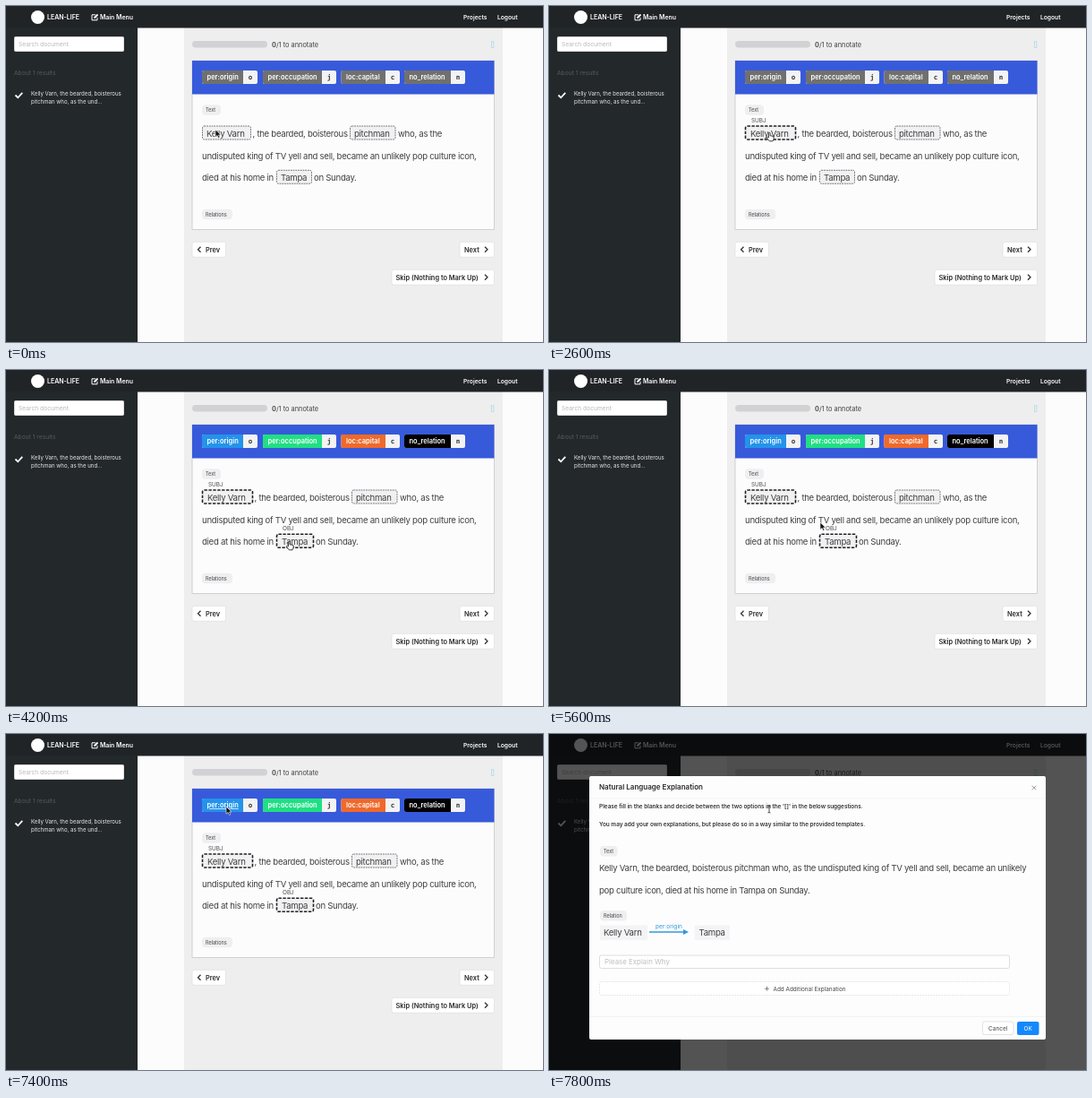
Animation, 600 px wide and 375 px high, one loop 8 s. Source, as an HTML page:

```html
<!DOCTYPE html>
<html lang="en">
<head>
<meta charset="utf-8">
<title>Relation annotation</title>
<style>
  html, body { margin: 0; height: 100%; overflow: hidden; background: #fff; }
  svg { display: block; width: 100vw; height: 100vh; font-family: Inter, Roboto, sans-serif; }
  .bold { font-weight: 600; }
  .body { font-size: 9.6px; letter-spacing: -.03em; fill: #404040; }
  .key { font: bold 7.5px "DejaVu Sans Mono", monospace; }
</style>
</head>
<body>
<svg id="stage" viewBox="0 0 600 375"></svg>
<script>
const PERSON = 'Kelly Varn';
const LOOP = 8000;

// Moments (ms) at which the interface changes.
const HOVER_SUBJECT = 600, PICK_SUBJECT = 2200, HOVER_OBJECT = 3200, PICK_OBJECT = 4200,
      HOVER_LABEL = 6400, MODAL_OPENING = 7600, MODAL_OPEN = 7800;

// Cursor steps: start time, x, y, shape.
const CURSOR = [
  [0, 234, 138, 'arrow'], [600, 234, 139, 'hand'], [1400, 236, 140, 'hand'],
  [1600, 239, 140.5, 'hand'], [2600, 243, 141, 'hand'], [2800, 280, 159, 'arrow'],
  [3000, 300, 180, 'arrow'], [3200, 311, 191, 'hand'], [3400, 313, 191, 'hand'],
  [5600, 303, 170, 'arrow'], [5800, 285, 135, 'arrow'], [6000, 277, 123, 'arrow'],
  [6200, 267, 105, 'arrow'], [6400, 257, 82, 'hand'], [6600, 242, 82, 'hand'],
  [7400, 246, 81, 'arrow'], [7800, 246, 84, 'beam']
];

const rect = (x, y, w, h, fill, attrs = '') =>
  `<rect x="${x}" y="${y}" width="${w}" height="${h}" fill="${fill}" ${attrs}/>`;
const text = (x, y, size, str, attrs = '') =>
  `<text x="${x}" y="${y}" font-size="${size}" ${attrs}>${str}</text>`;
const line = (d, color, width = 1, attrs = '') =>
  `<path d="${d}" fill="none" stroke="${color}" stroke-width="${width}" ${attrs}/>`;
const body = (x, y, str) => text(x, y, 9.6, str, 'class="body"');
const caption = (x, y, w, str) =>
  rect(x, y, w, 11.5, '#efeef0', 'rx="4"') + text(x + 4, y + 7.9, 5.5, str, 'fill="#444"');

function entity(x, y, w, str, hover, picked, role) {
  const border = picked
    ? 'stroke="#222" stroke-width="1.6" stroke-dasharray="3.4 1.5"'
    : 'stroke="#666" stroke-width=".9" stroke-dasharray="1.8 .9"';
  const grow = picked ? 1 : 0;
  return rect(x + .5, y - 12, w + 2 * grow, 15, hover ? '#fdfdfd' : '#f1f0f2', 'rx="2" ' + border) +
    body(x + 5 + grow, y, str) +
    (picked ? text(x + 7, y - 16.3, 6.4, role, 'fill="#4a4a4a"') : '');
}

function label(x, w, name, key, color, underline) {
  const split = x + w;
  return rect(x, 72, w + 16, 15, '#f3f3f3', 'rx="2"') +
    `<path d="M${split} 72H${x + 2}q-2 0-2 2v11q0 2 2 2H${split}z" fill="${color}"/>` +
    text(x + 5.5, 82.2, 7.5, name,
      `class="bold" fill="#fff" ${underline ? 'text-decoration="underline"' : ''}`) +
    text(split + 8, 82.2, 7.5, key, 'class="key" text-anchor="middle" fill="#333"');
}

function button(x, y, w, str, textX, chevron) {
  return rect(x, y, w, 17, '#fff', 'rx="2" stroke="#dedddf" stroke-width=".7"') +
    text(textX, y + 11.3, 7.4, str, 'class="bold" fill="#2a2a2a"') +
    (chevron < 0 ? line(`M217.5 ${y + 5.5}l-3 3 3 3`, '#333', 1.3)
                 : line(`M535 ${y + 5.5}l3 3-3 3`, '#333', 1.3));
}

function relation(x, y, nameX, size, start, end, labelX) {
  return body(x, y, PERSON) + body(nameX, y, 'Tampa') +
    line(`M${start} ${y - 4}H${end - 4}`, '#3298dc', 1.5) +
    `<path d="M${end} ${y - 4}l-6-3v6z" fill="#3298dc"/>` +
    text(labelX, y - 8, size, 'per:origin', 'fill="#3298dc"');
}

function topBar() {
  return rect(0, 0, 600, 24.5, '#202427') +
    '<circle cx="35.5" cy="12.5" r="7.5" fill="#fff"/>' +
    '<g class="bold" fill="#fff">' +
    text(46, 15.2, 7, 'LEAN-LIFE') + text(105, 15.2, 6.9, 'Main Menu') +
    text(511, 15.2, 6.7, 'Projects') + text(549, 15.2, 6.7, 'Logout') + '</g>' +
    line('M100 9.8h-4v6h6v-3', '#fff') + line('M98.5 13.5l4-4', '#fff', 1.8);
}

function sidebar() {
  return rect(0, 24, 147, 351, '#23282b') +
    rect(9.5, 34.5, 122, 16, '#fff', 'rx="1" stroke="#dbdbdb"') +
    text(14, 45, 6.7, 'Search document', 'fill="#b9b9b9"') +
    text(9, 77, 6.7, 'About 1 results', 'fill="#555a5e"') +
    line('M10.5 99.5l2.8 2.8 5-5.5', '#fff', 1.8) +
    '<g fill="#e8e8e8">' + text(28, 100, 6.1, PERSON + ', the bearded, boisterous') +
    text(28, 109, 6.1, 'pitchman who, as the und...') + '</g>';
}

function page(t) {
  const subject = t >= PICK_SUBJECT, object = t >= PICK_OBJECT, related = t >= MODAL_OPENING;
  const shiftSubject = subject ? 2 : 0, shiftObject = object ? 2 : 0, drop = related ? 25 : 0;
  const color = c => object ? c : '#70706f';
  return rect(0, 0, 600, 375, '#fdfcfd') + rect(199, 24, 356, 351, '#efeeef') +
    topBar() + sidebar() +
    rect(208, 39, 84, 7.5, '#d2d1d3', 'rx="3.75"') +
    text(297, 46, 7.4, '<tspan class="bold">0</tspan>/1 to annotate', 'fill="#444"') +
    rect(542.3, 39.8, 2.6, 6.6, '#e6f4f5', 'stroke="#a9d3d8" stroke-width=".7"') +
    rect(208, 61, 337.5, 188.5 + drop, '#fdfcfd', 'stroke="#c8c7c9" stroke-width=".8"') +
    rect(208, 61, 337.5, 37.5, '#375adb') +
    label(219, 46, 'per:origin', 'o', color('#2493ea'), t >= HOVER_LABEL && !related) +
    label(287, 66, 'per:occupation', 'j', color('#20df83')) +
    label(374.5, 49.5, 'loc:capital', 'c', color('#f0692a')) +
    label(445, 52, 'no_relation', 'n', color('#000')) +
    caption(219, 110.3, 21, 'Text') +
    entity(219, 146, 54, PERSON, t >= HOVER_SUBJECT && !subject, subject, 'SUBJ') +
    body(275.5 + shiftSubject, 146, ', the bearded, boisterous') +
    entity(384 + shiftSubject, 146, 50.5, 'pitchman') +
    body(438 + shiftSubject, 146, 'who, as the') +
    body(219, 170.5, 'undisputed king of TV yell and sell, became an unlikely pop culture icon,') +
    body(219, 195.3, 'died at his home in') +
    entity(302, 195.3, 39, 'Tampa', t >= HOVER_OBJECT && !object, object, 'OBJ') +
    body(344 + shiftObject, 195.3, 'on Sunday.') +
    caption(219, 226.7, 34, 'Relations') +
    (related ? relation(224, 255, 330, 6.8, 275, 317, 281) +
      '<circle cx="530" cy="251.5" r="3.4" fill="none" stroke="#444" stroke-width=".8"/>' +
      line('M528.2 251.5h3.6', '#444', .9) : '') +
    button(208, 263.3 + drop, 37.5, 'Prev', 223, -1) +
    button(507, 263.3 + drop, 38.5, 'Next', 512, 1) +
    button(431, 294.3 + drop, 114.5, 'Skip (Nothing to Mark Up)', 435.5, 1);
}

function modal() {
  return rect(45, 47, 510, 294, '#fefdfe', 'rx="2"') +
    text(56, 62.3, 8.03, 'Natural Language Explanation', 'font-weight="600" fill="#2b2b2b"') +
    line('M539.7 57.7l4.6 4.6m0-4.6l-4.6 4.6', '#888', .8) +
    line('M45 72H555M45 315.5H555', '#efeeef', .7) +
    '<g class="bold" fill="#333">' +
    text(56, 82.5, 6.42, "Please fill in the blanks and decide between the two options in the '[]' in the below suggestions.") +
    text(56, 103, 6.42, 'You may add your own explanations, but please do so in a way similar to the provided templates.') + '</g>' +
    caption(57, 125, 19.5, 'Text') +
    body(56, 153, PERSON + ', the bearded, boisterous pitchman who, as the undisputed king of TV yell and sell, became an unlikely') +
    body(56, 178, 'pop culture icon, died at his home in Tampa on Sunday.') +
    caption(57, 197, 30, 'Relation') +
    rect(57, 213.5, 53, 16.5, '#f4f3f5') + rect(162.5, 213.5, 39.5, 16.5, '#f4f3f5') +
    relation(61, 225, 167.5, 6.6, 112, 156, 119) +
    rect(56.5, 247, 458, 14.5, '#fff', 'rx="2" stroke="#d5d4d6" stroke-width=".8"') +
    text(62, 257, 7.9, 'Please Explain Why', 'fill="#bdbdbd"') +
    rect(56.5, 276.5, 458, 15, '#fff', 'rx="2" stroke="#dcdcdc" stroke-width=".7" stroke-dasharray="1.8 1.2"') +
    line('M241 284.2h5m-2.5-2.5v5', '#555', .7) +
    text(250.5, 286.6, 6.4, 'Add Additional Explanation', 'fill="#444"') +
    rect(484.5, 321, 34.5, 14.5, '#fff', 'rx="2" stroke="#d5d4d6" stroke-width=".7"') +
    text(501.7, 330.8, 6.5, 'Cancel', 'text-anchor="middle" fill="#444"') +
    rect(523, 321, 24.5, 15, '#1688fb', 'rx="2"') +
    text(535.2, 330.8, 6.5, 'OK', 'text-anchor="middle" fill="#fff"');
}

function overlay(t) {
  if (t < MODAL_OPENING) return '';
  const open = t >= MODAL_OPEN;
  const pose = open ? '' : 'transform="translate(138.7 92.2) scale(.539)" opacity=".34"';
  return rect(0, 0, 600, 375, '#000', `opacity="${open ? .67 : .2}"`) + `<g ${pose}>${modal()}</g>`;
}

const CURSOR_SHAPES = {
  arrow: '<path d="M0 0v8.2l2-1.8 1.4 3 1.4-.6-1.3-2.9h2.6z" fill="#111" stroke="#fff" stroke-width=".6"/>',
  hand: '<path d="M2.5 5.8V1.2q0-1 .8-1t.8 1v2.6q2 0 4 1v2.5l-1 2.5H3.2L.5 6.2q-.2-1 .8-.9z" fill="#fff" stroke="#111" stroke-width=".8"/>',
  beam: line('M-1.5-4q1.5 0 1.5 1v6q0 1-1.5 1M1.5-4Q0-4 0-3m0 6q0 1 1.5 1', '#222', .8)
};

function cursor(t) {
  const [, x, y, shape] = CURSOR.filter(step => step[0] <= t).pop();
  return `<g transform="translate(${x} ${y})">${CURSOR_SHAPES[shape]}</g>`;
}

const stage = document.getElementById('stage');
let shown = -1;

function frame(now) {
  // Every change falls on a 200 ms boundary.
  const t = Math.floor(now % LOOP / 200) * 200;
  if (t !== shown) {
    shown = t;
    stage.innerHTML = page(t) + overlay(t) + cursor(t);
  }
  requestAnimationFrame(frame);
}
frame(performance.now());
</script>
</body>
</html>
```
